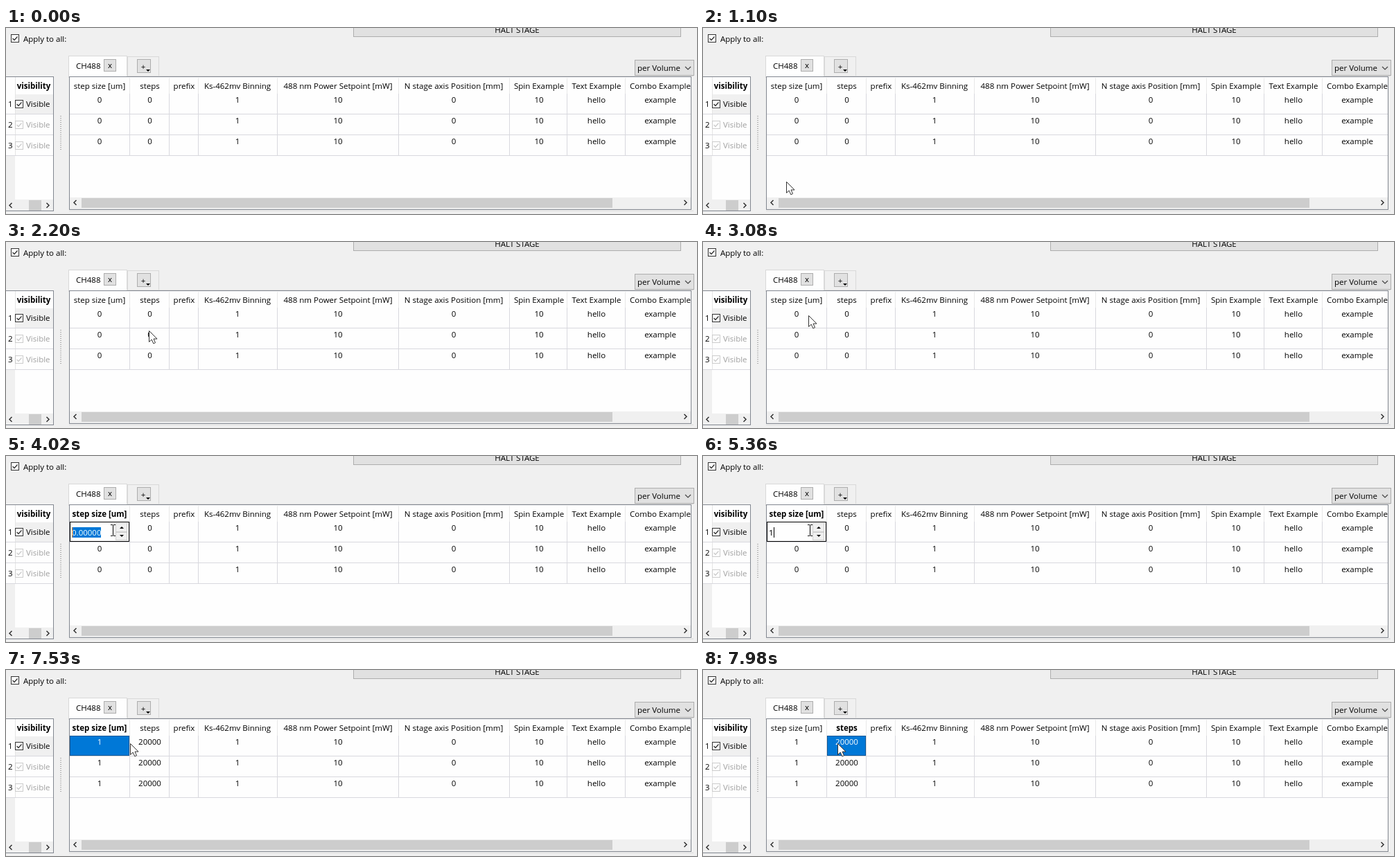
Animation of 997x269 px, one loop 8 s. Source, as an HTML page with a canvas:

```html
<!DOCTYPE html>
<html lang="en">
<head>
<meta charset="utf-8">
<style>
html, body { margin: 0; width: 997px; height: 269px; overflow: hidden; background: #f0f0f0; }
canvas { display: block; }
</style>
</head>
<body>
<canvas id="stage" width="997" height="269"></canvas>
<script>
const g = document.getElementById('stage').getContext('2d');
const LOOP = 8000;
const PAGE = '#f0f0f0', WHITE = '#fefefe', BUTTON = '#e1e1e1', THUMB = '#cdcdcd',
      EDGE = '#adadad', FRAME = '#828790', GRID = '#d8d8de', INK = '#000',
      DIM = '#a0a0a0', BLUE = '#0078d7';

// When the interface changes state
const SELECT = 3640, EDIT = 3790, TYPE = 5120, COMMIT = 5900, NEXT = 7940;

const edges = [92, 178, 235, 277, 391, 566, 726, 809, 893, 988];
const columns = [
  ['step size [um]', 135, '0'], ['steps', 207.5, '0'], ['prefix', 257, ''],
  ['Ks-462mv Binning', 334, '1'], ['488 nm Power Setpoint [mW]', 479, '10'],
  ['N stage axis Position [mm]', 646, '0'], ['Spin Example', 769, '10'],
  ['Text Example', 852, 'hello'], ['Combo Example', 944, 'example']
];

// Pointer path: time, x, y
const path = [
  [700, 10, 271], [1100, 120, 222], [1500, 222, 176], [1640, 222, 152],
  [2240, 205, 126], [2340, 205, 126], [3080, 152, 106], [COMMIT, 152, 106],
  [COMMIT, 158, 107], [7110, 158, 107], [7840, 194, 106], [LOOP, 194, 106]
];

function box(x, y, w, h, fill, stroke) {
  g.fillStyle = fill;
  g.fillRect(x, y, w, h);
  if (!stroke) return;
  g.strokeStyle = stroke;
  g.lineWidth = 1;
  g.strokeRect(x + .5, y + .5, w - 1, h - 1);
}

function line(points, color = INK, width = 1) {
  g.strokeStyle = color;
  g.lineWidth = width;
  g.beginPath();
  points.forEach(p => g.lineTo(...p));
  g.stroke();
}

function shape(points, fill) {
  g.fillStyle = fill;
  g.beginPath();
  points.forEach(p => g.lineTo(...p));
  g.closePath();
  g.fill();
}

function text(s, x, y, align = 'left', color = INK, bold = false) {
  g.font = (bold ? 'bold ' : '') + '11.5px "Open Sans", "Noto Sans", sans-serif';
  g.textAlign = align;
  g.fillStyle = color;
  g.fillText(s, x, y);
}

function hline(x1, x2, y, color = GRID) { box(x1, y, x2 - x1, 1, color); }
function vline(x, y1, y2, color = GRID) { box(x, y1, 1, y2 - y1, color); }

function checkbox(x, y, color) {
  box(x, y, 12, 12, WHITE, color);
  line([[x + 2.5, y + 6], [x + 5, y + 8.5], [x + 9.5, y + 3.5]], color, 1.3);
}

// Angle bracket pointing left (-1) or right (1)
function bracket(x, y, dir) {
  line([[x - dir * 1.5, y - 3.5], [x + dir * 2, y], [x - dir * 1.5, y + 3.5]], '#333', 1.5);
}

function drawControls() {
  box(0, 0, 997, 269, PAGE);
  checkbox(7, 9, '#333');
  text('Apply to all:', 25, 20);
  box(501, -10, 473, 23, BUTTON, EDGE);
  text('HALT STAGE', 737.5, 7, 'center');

  box(175, 41, 46, 30, PAGE, '#d9d9d9');
  box(90, 40, 85, 32, WHITE, '#d9d9d9');
  text('CH488', 101, 59);
  box(141, 45, 18, 18, BUTTON, EDGE);
  text('x', 150, 58, 'center');
  box(189, 45, 20, 20, BUTTON, EDGE);
  text('+', 198, 60, 'center');
  shape([[202, 60], [208, 60], [205, 63]], INK);

  box(907, 46, 86, 23, BUTTON, EDGE);
  text('per Volume', 911, 62);
  line([[980, 56], [984, 60], [988, 56]], '#444', 1.2);
}

function drawSidebar() {
  box(-1, 70, 70, 195, WHITE, FRAME);
  box(0, 185, 13, 64, PAGE);
  box(14, 96, 54, 28, PAGE);
  vline(13, 71, 185, '#e5e5e5');
  text('visibility', 40, 88, 'center', INK, true);
  for (let i = 0; i < 3; i++) {
    const y = 114 + i * 30, color = i ? DIM : '#333';
    text(i + 1, 3, y);
    checkbox(13, y - 10, i ? '#cccccc' : color);
    text('Visible', 29, y, 'left', i ? color : INK);
    hline(0, 68, 124 + i * 30);
  }
  box(0, 248, 68, 16, PAGE);
  bracket(7, 256.5, -1);
  box(33, 249, 18, 15, THUMB);
  bracket(60, 256.5, 1);
  for (let y = 127; y < 178; y += 3) box(78, y, 2, 1, '#b0b0b0');
}

function drawTable(t) {
  box(91, 70, 898, 193, WHITE, FRAME);
  hline(175, 992, 69, '#dcdcdc');
  hline(91, 992, 264, '#dcdcdc');
  const done = t >= COMMIT;
  const active = t < SELECT ? -1 : t < NEXT ? 0 : 1;
  const editing = t >= EDIT && t < COMMIT;

  for (const y of [124, 154, 184]) hline(92, 988, y);
  edges.slice(1, -1).forEach(x => {
    vline(x, 72, 95, '#e8e8e8');
    vline(x, 95, 185);
  });

  columns.forEach(([title, x, value], c) => {
    const on = c === active;
    text(title, x, 88, 'center', INK, on);
    if (on) {
      const left = edges[c] + (c ? 1 : 0), w = edges[c + 1] - left;
      box(left, 95, w, 29, BLUE);
      g.setLineDash([1, 1]);
      g.strokeStyle = '#103858';
      g.strokeRect(left + .5, 95.5, w - 1, 28);
      g.setLineDash([]);
    }
    if (done && c < 2) value = c ? '20000' : '1';
    for (let r = 0; r < 3; r++)
      if (r || !on || !editing)
        text(value, x, 108 + r * 30, 'center', on && !r ? '#fff' : INK);
  });
  if (editing) drawEditor(t);

  box(92, 245, 896, 17, PAGE);
  bracket(100, 252.5, -1);
  box(109, 246, 766, 14, THUMB);
  bracket(980, 252.5, 1);
}

function drawEditor(t) {
  box(92, 95, 86, 29, WHITE, INK);
  if (t < TYPE) {
    box(95, 103, 42, 15, BLUE);
    text('0.00000', 95, 115, 'left', '#fff');
    const blink = Math.floor((t - EDIT) / 530) % 2 === 0;
    if (blink) vline(95, 103, 118, '#ff8728');
  } else {
    text('1', 95, 115);
    vline(102, 103, 118, INK);
  }
  box(158, 97, 17, 13, PAGE, '#d0d0d0');
  box(158, 110, 17, 12, PAGE, '#d0d0d0');
  shape([[164, 105], [170, 105], [167, 102]], INK);
  shape([[164, 114], [170, 114], [167, 117]], INK);
}

function pointerAt(t) {
  const i = path.findIndex(p => p[0] > t);
  const [t0, x0, y0] = path[i - 1], [t1, x1, y1] = path[i];
  const k = (t - t0) / (t1 - t0);
  return [Math.round(x0 + (x1 - x0) * k), Math.round(y0 + (y1 - y0) * k)];
}

function drawPointer(t) {
  if (t < path[0][0]) return;
  if (t >= EDIT && t < COMMIT) {
    vline(154, 100, 115, INK);
    for (const y of [99, 115]) {
      hline(151, 154, y, INK);
      hline(155, 158, y, INK);
    }
    return;
  }
  const [x, y] = pointerAt(t);
  const arrow = [[0, 0], [0, 16], [3.7, 12.6], [6.3, 18.4], [9, 17.2], [6.5, 11.6], [11.5, 11.6], [0, 0]]
    .map(([a, b]) => [x + .5 + a, y + .5 + b]);
  shape(arrow, '#fff');
  line(arrow, '#333');
}

function frame(now) {
  const t = now % LOOP;
  drawControls();
  drawSidebar();
  drawTable(t);
  drawPointer(t);
  requestAnimationFrame(frame);
}
frame(0);
</script>
</body>
</html>
```
